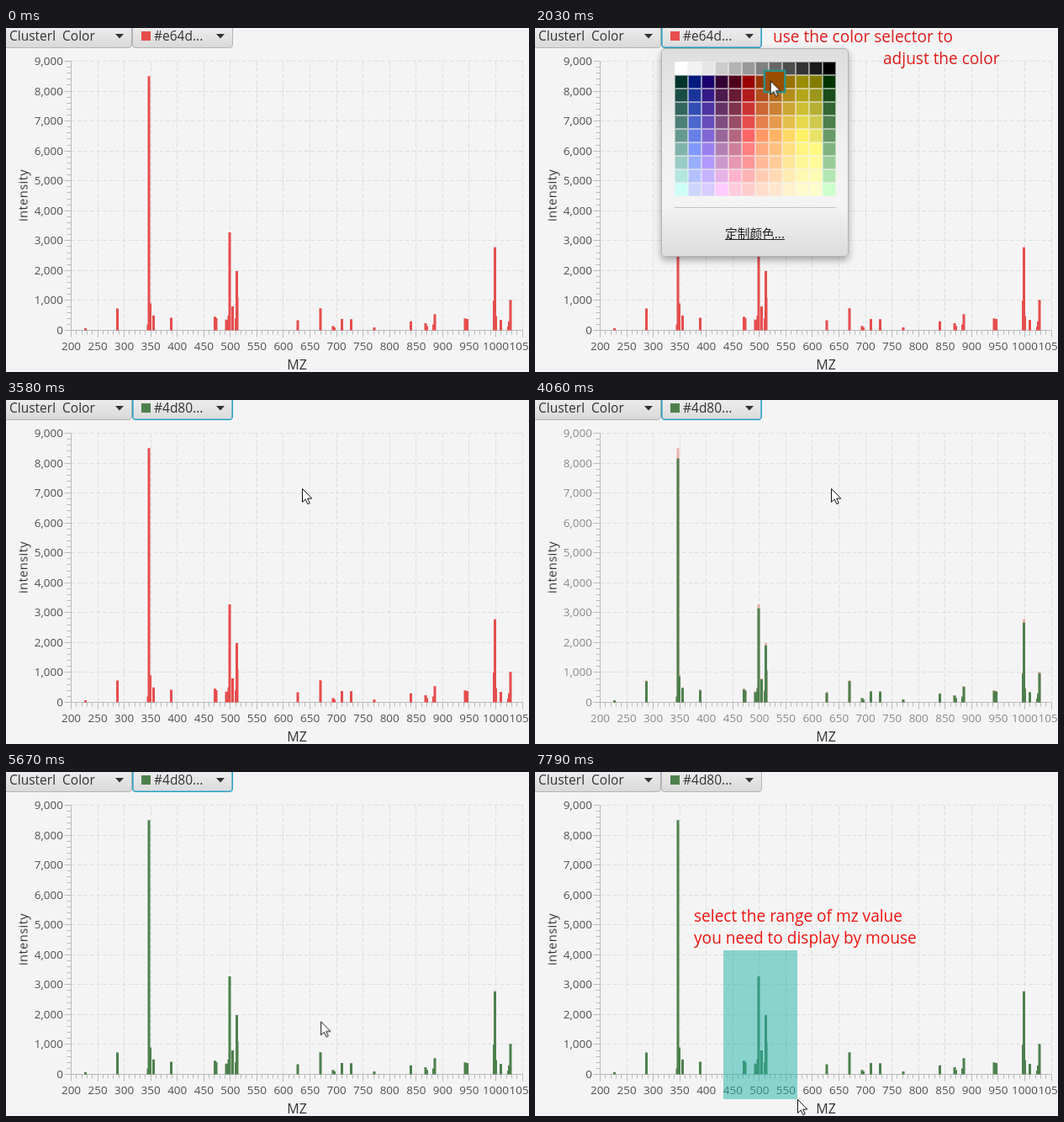
An HTML page that plays this animation: 622x409 px, repeating every 8 s.

```html
<!DOCTYPE html>
<html lang="en">
<head>
<meta charset="utf-8">
<title>Spectrum colour and range</title>
<style>
html, body { margin: 0; width: 100%; height: 100%; overflow: hidden; background: #f4f4f4; }
body { font-family: "Open Sans", "Noto Sans", sans-serif; }
#stage { position: relative; width: 622px; height: 409px; overflow: hidden; }
#stage > *, #popup > * { position: absolute; }
svg { left: 0; top: 0; overflow: visible; }
text { white-space: pre; }

/* every part shares one 8 s clock; parts jump unless a keyframe says otherwise */
.anim { animation: 8s step-end infinite; }

.grid { stroke: #dedede; stroke-dasharray: 5 2.5; fill: none; }
.axis { stroke: #bababa; fill: none; }
.ticks { font-size: 13.5px; fill: #515151; animation-name: ticks; }
.title { fill: #333; text-anchor: middle; }
.red { fill: #e64d4d; animation-name: fadeRed; }
.green { fill: #4d804d; transform-origin: 0 359px; animation-name: grow; }

.box {
  top: -6px; height: 30px; box-sizing: border-box;
  border: 1px solid #b4b4b4; border-radius: 4px;
  background-image: linear-gradient(#f0f0f0, #d9d9d9);
}
#cluster { left: -6px; width: 156px; }
#picker { left: 150px; width: 120px; animation-name: focus; }
.bar-text { font-size: 15.5px; fill: #333; }
.before { animation-name: before; }
.after { animation-name: after; }

#popup {
  left: 150px; top: 24px; width: 221px; height: 246px;
  border: 1px solid #b2b2b2; border-radius: 5px;
  background: linear-gradient(#dedede, #f0f0f0 45%, #f4f4f4 75%, #dcdcdc);
  box-shadow: 0 4px 8px rgba(0, 0, 0, .33);
}
.open { animation-name: open; }
#cells { left: 15px; top: 15px; width: 192px; height: 160px; display: grid; grid: repeat(10, 16px) / repeat(12, 16px); }
#cells i { box-shadow: inset 0 0 0 1px rgba(243, 243, 243, .55); }
#rule { left: 15px; top: 188px; width: 192px; height: 1px; background: #c4c4c4; }
#link {
  left: 0; width: 221px; top: 208px; text-align: center; color: #222;
  font: 14.7px/22px "Noto Sans CJK SC", "Noto Sans CJK", sans-serif; text-decoration: underline;
}
#origin { left: 15px; top: 15px; }
#hover {
  position: absolute; left: -6px; top: -6px; width: 22px; height: 23px; border: 2px solid #2a8f86;
  box-shadow: 0 0 2px #2a9d94; animation-name: hover;
}

.note { font-size: 19.08px; }
.note.open { fill: #e01b1b; }
.range { fill: #f0140f; animation-name: range; }
#select { left: 224px; top: 212px; background: rgba(32, 178, 170, .5); animation-name: select; }
#cursor { width: 14px; height: 21px; animation-name: cursor; }

@keyframes before { 0% { opacity: 1 } 44.75%, 100% { opacity: 0 } }
@keyframes after { 0% { opacity: 0 } 44.75%, 100% { opacity: 1 } }
@keyframes open { 0% { opacity: 0 } 17.375% { opacity: 1 } 44.75%, 100% { opacity: 0 } }
@keyframes range { 0% { opacity: 0 } 87.625%, 100% { opacity: 1 } }
@keyframes focus {
  0%, 87.625%, 100% { border-color: #b4b4b4; box-shadow: none; background-image: linear-gradient(#f0f0f0, #d9d9d9) }
  11.625% { border-color: #b4b4b4; box-shadow: none; background-image: linear-gradient(#fafafa, #e6e6e6) }
  16.625% { border-color: #2a9fc6; box-shadow: inset 0 0 0 .6px #2a9fc6; background-image: linear-gradient(#f8f8f8, #e4e4e4) }
  17.375% { border-color: #2a9fc6; box-shadow: inset 0 0 0 .6px #2a9fc6; background-image: linear-gradient(#f0f0f0, #dbdbdb) }
}
@keyframes ticks {
  0% { opacity: 1 }
  45.75% { opacity: 0; animation-timing-function: linear }
  50.75% { opacity: .65; animation-timing-function: linear }
  52.625%, 100% { opacity: 1 }
}
@keyframes fadeRed {
  0% { opacity: 1 }
  45.75% { opacity: 1; animation-timing-function: linear }
  50.75% { opacity: .4; animation-timing-function: linear }
  52.625%, 100% { opacity: 0 }
}
@keyframes grow {
  0% { transform: scaleY(0) }
  45.75% { transform: scaleY(0); animation-timing-function: cubic-bezier(.2, 0, .8, 1) }
  51.25%, 100% { transform: scaleY(1) }
}
@keyframes hover {
  0% { opacity: 0; transform: none; background: #808080 }
  23.34% { opacity: 1; transform: translate(96px, 0); background: #808080 }
  25.31% { opacity: 1; transform: translate(112px, 16px); background: #994d00 }
  27.29% { opacity: 1; transform: translate(128px, 32px); background: #b38d1a }
  28.28% { opacity: 1; transform: translate(128px, 48px); background: #cca633 }
  30.25% { opacity: 1; transform: translate(144px, 64px); background: #e6d84d }
  31.25% { opacity: 1; transform: translate(144px, 48px); background: #ccbf33 }
  32.25% { opacity: 1; transform: translate(160px, 32px); background: #9c971a }
  33.25% { opacity: 1; transform: translate(160px, 48px); background: #b5b033 }
  34.25%, 100% { opacity: 1; transform: translate(176px, 64px); background: #4d804d }
}
@keyframes cursor {
  0% { opacity: 0; transform: translate(565px, 447px) }
  5.75% { opacity: 1; transform: translate(565px, 447px); animation-timing-function: steps(7, start) }
  12.6% { opacity: 1; transform: translate(236px, 9px) }
  20.375% { opacity: 1; transform: translate(236px, 9px); animation-timing-function: steps(11, start) }
  31.24% { opacity: 1; transform: translate(316px, 107px) }
  31.25% { opacity: 1; transform: translate(322px, 95px) }
  32.25% { opacity: 1; transform: translate(330px, 82px) }
  33.25% { opacity: 1; transform: translate(338px, 92px) }
  34.25% { opacity: 1; transform: translate(352px, 105px) }
  60.5% { opacity: 1; transform: translate(352px, 105px); animation-timing-function: steps(5, start) }
  65.375% { opacity: 1; transform: translate(417px, 190px); animation-timing-function: steps(6, start) }
  70.87% { opacity: 1; transform: translate(405px, 304px) }
  70.875% { opacity: 1; transform: translate(385px, 303px); animation-timing-function: steps(11, start) }
  81.6% { opacity: 1; transform: translate(266px, 229px) }
  81.75% { opacity: 1; transform: translate(266px, 229px); animation-timing-function: steps(5, start) }
  86.44% { opacity: 1; transform: translate(224px, 212px) }
  87.625% { opacity: 1; transform: translate(226px, 228px) }
  88.5% { opacity: 1; transform: translate(229px, 245px) }
  89.5% { opacity: 1; transform: translate(229px, 245px); animation-timing-function: steps(9, start) }
  98.36%, 100% { opacity: 1; transform: translate(312px, 389px) }
}
@keyframes select {
  0% { opacity: 0; width: 5px; height: 33px }
  89.5% { opacity: 1; width: 5px; height: 33px; animation-timing-function: steps(9, start) }
  98.36%, 100% { opacity: 1; width: 88px; height: 177px }
}
</style>
</head>
<body>
<div id="stage">
  <svg id="chart" width="622" height="409"></svg>

  <div id="cluster" class="box"></div>
  <div id="picker" class="box anim"></div>
  <svg width="622" height="409" class="bar-text">
    <text x="4" y="15">ClusterI</text>
    <text x="67" y="15">Color</text>
    <path d="M130 7h10l-5 5.5zM250 7h10l-5 5.5z"/>
    <g class="anim before"><path d="M161 4h11v11h-11z" fill="#e64d4d"/><text x="176" y="15">#e64d...</text></g>
    <g class="anim after"><path d="M161 4h11v11h-11z" fill="#4d804d"/><text x="176" y="15">#4d80...</text></g>
  </svg>

  <div id="popup" class="anim open">
    <div id="cells"></div>
    <div id="rule"></div>
    <div id="link">定制颜色...</div>
    <div id="origin"><div id="hover" class="anim"></div></div>
  </div>

  <svg width="622" height="409">
    <g class="note anim open">
      <text x="283" y="17">use the color selector to</text>
      <text x="414" y="43">adjust the color</text>
    </g>
    <g class="note anim range">
      <text x="189" y="178">select the range of mz value</text>
      <text x="189" y="204">you need to display by mouse</text>
    </g>
  </svg>
  <div id="select" class="anim"></div>
  <svg id="cursor" class="anim" viewBox="0 0 14 21">
    <path d="M.5 .5v16l3.7-3.5 2.6 5.7 2.4-1.1-2.5-5.5h5.1z" fill="#fff" stroke="#111"/>
  </svg>
</div>

<script>
const LEFT = 77.5, RIGHT = 614, TOP = 39.5, BASE = 359.5;
const px = mz => LEFT + (mz - 200) * 0.6312;
const py = v => BASE - v * 0.03555;
const crisp = n => Math.floor(n) + 0.5;

// [x in pixels, intensity]
const peaks = [
  [94.5, 70], [132.5, 730], [169, 200], [170, 8500], [171.5, 900], [175.5, 500], [196.5, 420],
  [248.5, 460], [250, 410], [262, 360], [265, 500], [266, 3280], [269.5, 800], [273.5, 400],
  [274.5, 1980], [275, 1100], [347, 340], [374, 740], [389, 150], [390.5, 100], [399.5, 380],
  [410.5, 370], [438, 100], [481.5, 300], [499, 240], [500.5, 150], [508.5, 200], [510, 540],
  [546, 400], [548.5, 380], [580.5, 1000], [581.5, 2780], [582.5, 480], [588.5, 350],
  [597.5, 130], [598.5, 300], [600, 1020]
];

function drawChart() {
  let grid = '', axis = `M${LEFT} ${TOP}V${BASE}H${RIGHT}`, labels = '';
  for (let mz = 200; mz <= 1050; mz += 10) {
    const x = crisp(px(mz)), major = mz % 50 === 0;
    axis += `M${x} ${BASE}v${major ? 8 : 5}`;
    if (!major) continue;
    grid += `M${x} ${TOP}V${BASE}`;
    labels += `<text x="${px(mz)}" y="383" text-anchor="middle">${mz}</text>`;
  }
  for (let v = 0; v <= 9000; v += 200) {
    const y = crisp(py(v)), major = v % 1000 === 0;
    axis += `M${LEFT} ${y}h${major ? -8 : -5}`;
    if (!major) continue;
    grid += `M${LEFT} ${y}H${RIGHT}`;
    labels += `<text x="68" y="${py(v) + 4.5}" text-anchor="end">${v.toLocaleString('en-US')}</text>`;
  }
  const bars = peaks.map(([x, v]) => `M${x - 1.5} ${BASE}V${py(v)}h3V${BASE}z`).join('');
  document.getElementById('chart').innerHTML = `
    <path class="grid" d="${grid}"/><path class="axis" d="${axis}"/>
    <path class="anim red" d="${bars}"/><path class="anim green" d="${bars}"/>
    <g class="anim ticks">${labels}</g>
    <text class="title" x="346" y="406" font-size="16">MZ</text>
    <text class="title" font-size="14.7" letter-spacing=".4" transform="translate(25.5 199) rotate(-90)">intensity</text>`;
}

// lifts a dark hue towards white, row by row, keeping its channel ratios
function tint(hue, row) {
  const max = Math.max(...hue), low = 25.5 * row, high = Math.min(255, max + low);
  return hue.map(n => Math.round(low + n / max * (high - low)));
}

function drawPalette() {
  const greys = [255, 242, 230, 204, 179, 153, 128, 102, 77, 51, 26, 0].map(g => [g, g, g]);
  const hues = [
    [0, 51, 44], [0, 26, 128], [26, 0, 110], [51, 0, 51], [77, 0, 26], [153, 0, 0],
    [153, 51, 0], [153, 77, 0], [153, 115, 0], [153, 140, 0], [130, 125, 0], [0, 51, 0]
  ];
  const rows = [greys];
  for (let r = 0; r < 9; r++) rows.push(hues.map(hue => tint(hue, r)));
  document.getElementById('cells').innerHTML =
    rows.flat().map(c => `<i style="background:rgb(${c})"></i>`).join('');
}

drawChart();
drawPalette();
</script>
</body>
</html>
```
